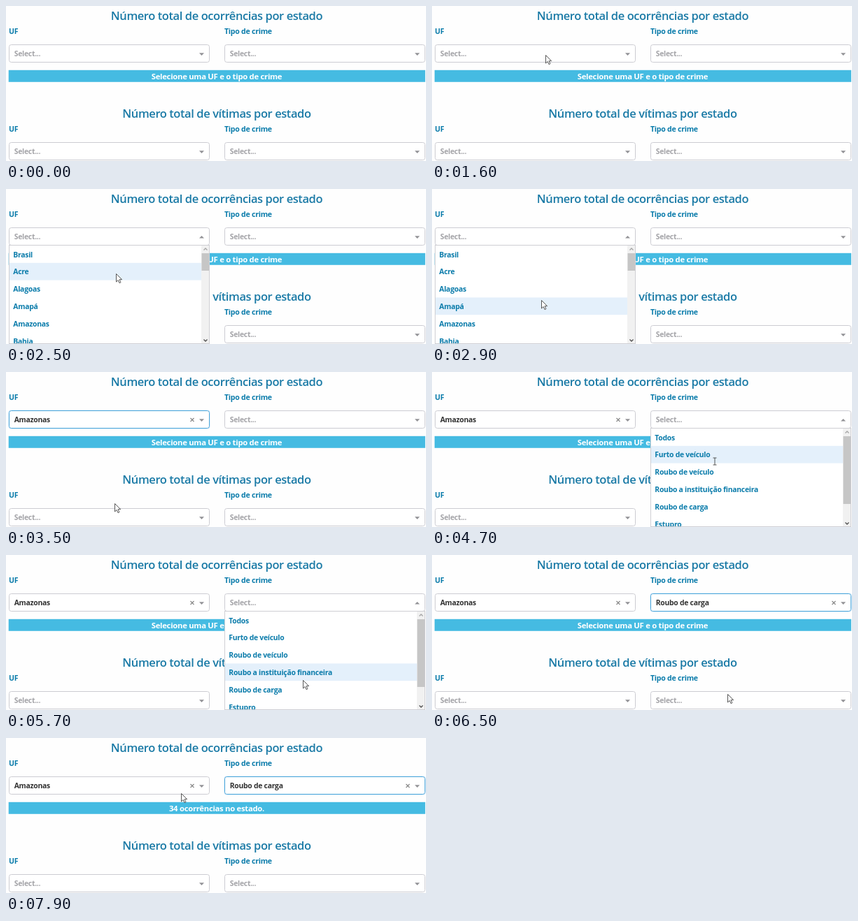
Recreate the animation shown at these times as an HTML page. Size 600 by 222 pixels, loop 8000 ms.

```html
<!DOCTYPE html>
<html lang="pt-BR">
<head>
<meta charset="utf-8">
<title>Ocorrências por estado</title>
<style>
html, body { margin: 0; width: 600px; height: 222px; overflow: hidden; background: #fefefe; }
svg { display: block; }
text { font: 700 10.4px "Open Sans", "Noto Sans", sans-serif; letter-spacing: -.025em; fill: #0b7cab; }
.title { font-size: 16.5px; font-weight: 600; text-anchor: middle; fill: #1a7aa6; }
.label { font-size: 10.6px; }
.banner { font-size: 11.3px; text-anchor: middle; fill: #fff; }
.hint { fill: #a4a4a8; }
.value { fill: #333; }
.box { fill: #fff; stroke: #ccccd2; }
.focus .box { stroke: #4ba6d8; }
.glow { fill: none; stroke: #007eff; stroke-width: 3; opacity: 0; }
.focus .glow { opacity: .1; }
.edge { fill: none; stroke: #cfcfd4; }
.chevron { fill: none; stroke-width: 1.3; }
.pointer { fill: #fff; stroke: #444; stroke-width: .9; }
</style>
</head>
<body>
<svg id="stage" width="600" height="222" viewBox="0 0 600 222"></svg>
<script>
const NS = 'http://www.w3.org/2000/svg';
const stage = document.getElementById('stage');
const LOOP = 8000, STEP = 100;
const LEFT = 4, RIGHT = 312, WIDTH = 286, CENTER = 301;
const MENU_TOP = 81, MENU_HEIGHT = 140, ROW = 24.8;

function add(parent, tag, attrs = {}, content = '') {
  const el = document.createElementNS(NS, tag);
  for (const key in attrs) el.setAttribute(key, attrs[key]);
  el.textContent = content;
  parent.append(el);
  return el;
}
const rect = (parent, x, y, width, height, more) => add(parent, 'rect', { x, y, width, height, ...more });
const path = (parent, d, more) => add(parent, 'path', { d, ...more });
const write = (parent, cls, x, y, content) => add(parent, 'text', { class: cls, x, y }, content);
const show = (el, on) => el.setAttribute('visibility', on ? 'visible' : 'hidden');

function makeSelect(x, y) {
  const g = add(stage, 'g');
  for (const cls of ['glow', 'box']) rect(g, x + .5, y + .5, WIDTH, 25, { class: cls, rx: 3 });
  const text = write(g, '', x + 7.7, y + 17, '');
  const cross = path(g, `M${x + 259.5} ${y + 11}l5 5m0-5l-5 5`, { stroke: '#888', 'stroke-width': 1.2 });
  const arrow = path(g, '', { fill: '#929296' });
  return (value, open, focus) => {
    text.textContent = value || 'Select...';
    text.setAttribute('class', value ? 'value' : 'hint');
    show(cross, value);
    arrow.setAttribute('d', `M${x + 272} ${y + (open ? 15.6 : 12.3)}h7l-3.5 ${open ? -3.6 : 3.6}z`);
    g.setAttribute('class', focus ? 'focus' : '');
  };
}

function makeMenu(x, options, thumbHeight) {
  const g = add(stage, 'g');
  const bar = x + 275;
  rect(g, x, MENU_TOP, WIDTH, MENU_HEIGHT, { fill: '#fff' });
  const hover = rect(g, x + 1, 0, 274, 0, { fill: '#e4f0fb' });
  options.forEach((name, i) => write(g, '', x + 6.3, MENU_TOP + ROW * i + 16.6, name));
  rect(g, bar, MENU_TOP, 11.5, MENU_HEIGHT, { fill: '#f1f1f1' });
  rect(g, bar + .5, MENU_TOP + 11, 10.5, thumbHeight, { fill: '#c6c6c6' });
  path(g, `M${bar + 3.5} 87.5l2.5-2.5 2.5 2.5`, { class: 'chevron', stroke: '#a5a5a5' });
  path(g, `M${bar + 3.5} 215.5l2.5 2.5 2.5-2.5`, { class: 'chevron', stroke: '#505050' });
  rect(g, x + .5, MENU_TOP - .5, WIDTH, MENU_HEIGHT + 1, { class: 'edge' });
  return (open, y) => {
    show(g, open);
    const row = Math.max(0, Math.floor((y - MENU_TOP) / ROW));
    hover.setAttribute('y', MENU_TOP + ROW * row);
    hover.setAttribute('height', Math.min(ROW, MENU_HEIGHT - ROW * row));
  };
}

function makeSection(y, title) {
  write(stage, 'title', CENTER, y + 19.5, title);
  return [[LEFT, 'UF'], [RIGHT, 'Tipo de crime']].map(([x, label]) => {
    write(stage, 'label', x, y + 40, label);
    return makeSelect(x, y + 55);
  });
}

const [setState, setCrime] = makeSection(0, 'Número total de ocorrências por estado');
rect(stage, 3.7, 91.8, 595.2, 17, { fill: '#45bbe2' });
const banner = write(stage, 'banner', CENTER, 104.7, '');
makeSection(140, 'Número total de vítimas por estado').forEach(set => set('', false, false));

const stateMenu = makeMenu(LEFT, ['Brasil', 'Acre', 'Alagoas', 'Amapá', 'Amazonas', 'Bahia'], 25);
const crimeMenu = makeMenu(RIGHT, ['Todos', 'Furto de veículo', 'Roubo de veículo',
  'Roubo a instituição financeira', 'Roubo de carga', 'Estupro'], 97);

const pointer = add(stage, 'g', { class: 'pointer' });
const arrow = path(pointer, 'M.5.5V12L3.2 9.5 5 13.6 6.9 12.8 5.1 8.7H8.6Z');
const beam = path(pointer, 'M-2.5-5h5M0-5V5M-2.5 5h5');

// Each move: start time, end time, destination
const entry = [438, 2];
const moves = [
  [700, 1100, 310, 136],
  [1100, 1600, 162, 70],
  [2200, 2500, 157, 121],
  [2500, 3200, 155, 188],
  [3500, 4300, 400, 70],
  [4400, 4700, 404, 128],
  [4700, 5700, 424, 179],
  [5700, 6100, 422, 199],
  [7200, 7900, 250, 79]
];

function position(t) {
  return moves.reduce(([x, y], [from, to, toX, toY]) => {
    const k = Math.min(1, Math.max(0, (t - from) / (to - from)));
    return [x + (toX - x) * k, y + (toY - y) * k];
  }, entry);
}

function draw(now) {
  const t = Math.floor((now % LOOP) / STEP) * STEP;
  const within = (from, to) => t >= from && t < to;
  const [x, y] = position(t);
  const stateOpen = within(1900, 3500), crimeOpen = within(4200, 6300);

  setState(t >= 3500 ? 'Amazonas' : '', stateOpen, within(3500, 4200));
  setCrime(t >= 6300 ? 'Roubo de carga' : '', crimeOpen, t >= 6300);
  stateMenu(stateOpen, y);
  crimeMenu(crimeOpen, y);
  banner.textContent = t >= 7000 ? '34 ocorrências no estado.' : 'Selecione uma UF e o tipo de crime';

  const typing = within(2000, 2400) || within(4300, 4800);
  pointer.setAttribute('transform', `translate(${Math.round(x)} ${Math.round(y)})`);
  show(arrow, t >= 700 && !typing);
  show(beam, typing);
}

const start = performance.now();
function tick() {
  draw(performance.now() - start);
  requestAnimationFrame(tick);
}
tick();
</script>
</body>
</html>
```
